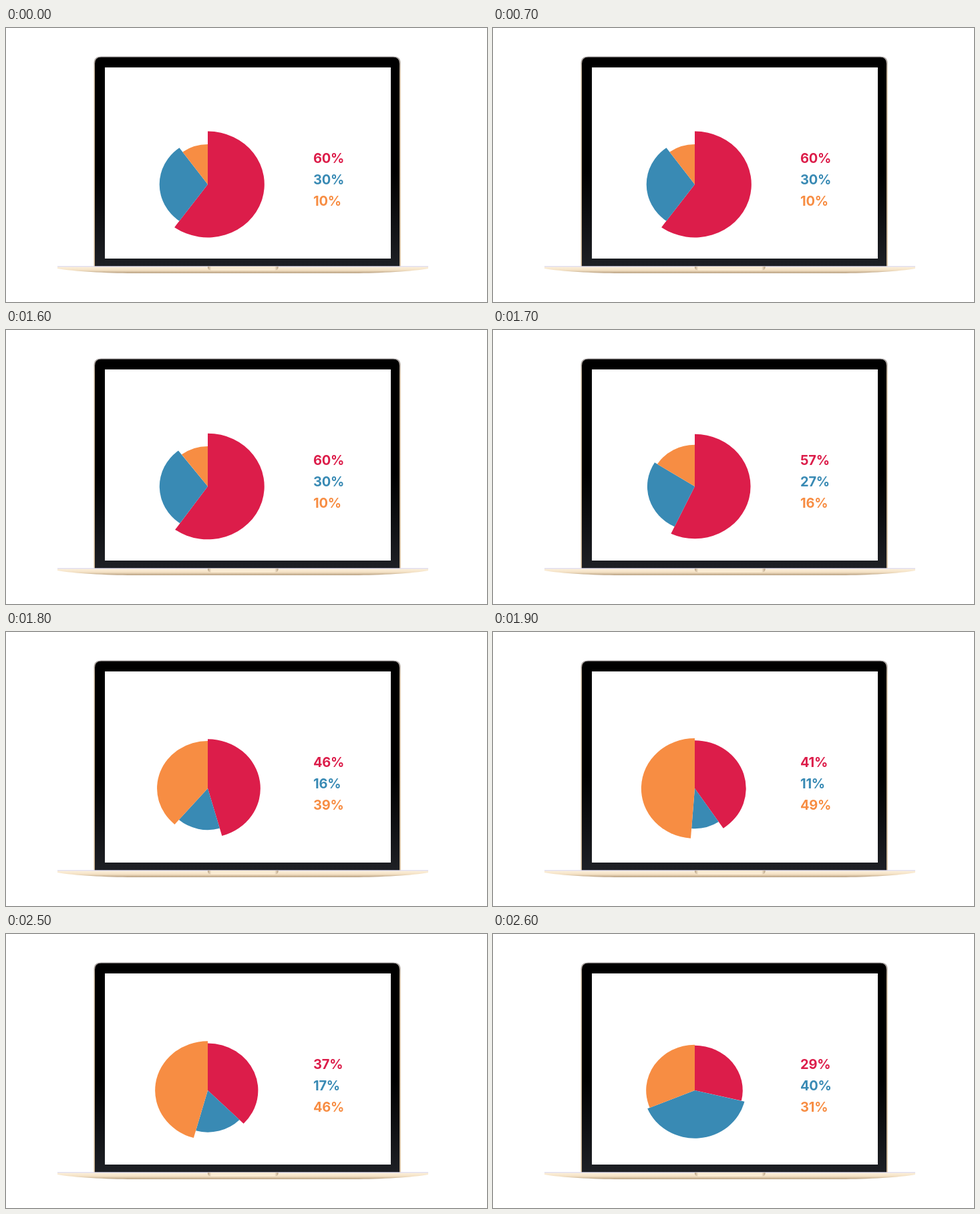
Animation, 720 px wide and 410 px high, one loop 2700 ms. Source, as an HTML page:

```html
<!DOCTYPE html>
<html lang="en">
<head>
<meta charset="utf-8">
<title>Pie chart on a laptop</title>
<style>
  html, body { margin: 0; width: 100%; height: 100%; overflow: hidden; background: #fff; }
  svg { display: block; width: 720px; height: 410px; }
  text { font: 700 20px Inter, Lato, sans-serif; letter-spacing: -0.2px; }
</style>
</head>
<body>
<svg viewBox="0 0 720 410">
  <defs>
    <linearGradient id="bezel" x1="0" y1="0" x2="0" y2="1">
      <stop offset="0.55" stop-color="#000"/>
      <stop offset="1" stop-color="#1e2025"/>
    </linearGradient>
    <linearGradient id="edge" x1="0" y1="0" x2="0" y2="1">
      <stop offset="0" stop-color="#a9a5a6"/>
      <stop offset="0.08" stop-color="#cdb99f"/>
      <stop offset="1" stop-color="#cdb594"/>
    </linearGradient>
    <linearGradient id="base" x1="0" y1="0" x2="0" y2="1">
      <stop offset="0.1" stop-color="#fcefd9"/>
      <stop offset="0.55" stop-color="#f3e0c3"/>
      <stop offset="1" stop-color="#b8a081"/>
    </linearGradient>
    <linearGradient id="notch">
      <stop offset="0" stop-color="#b9a284"/>
      <stop offset="0.05" stop-color="#fbecd3"/>
      <stop offset="0.95" stop-color="#fbecd3"/>
      <stop offset="1" stop-color="#b9a284"/>
    </linearGradient>
  </defs>

  <path fill="url(#edge)" d="M131.5 357V53Q131.5 42.5 142 42.5H580Q590.8 42.5 590.8 53V357Z"/>
  <path fill="url(#bezel)" d="M133 357V53.5Q133 43.8 142.5 43.8H579.5Q589 43.8 589 53.5V357Z"/>
  <path fill="#fff" d="M148 59H576V345H148Z"/>
  <path fill="url(#base)" d="M77 357H632V360C610 364 560 367 520 367H190C150 367 100 364 77 360Z"/>
  <path fill="#dcd9ee" d="M77 356.3H632V357.5H77Z"/>
  <path fill="url(#notch)" d="M302 357H407.5V359Q406.5 362.5 402 362.5H307.5Q303 362.5 302 359Z"/>

  <g id="chart"></g>
</svg>
<script>
  const LOOP = 2700, STEP = 100, EASE_MS = 621;
  const CX = 302, CY = 234, STRETCH = 1.068;
  const COLORS = ['#dc1d4a', '#398ab4', '#f78d43'];
  const STATES = [[60, 30, 10], [40, 10, 50], [25, 50, 25]];
  const STARTS = [1456, 2249];

  const chart = document.getElementById('chart');
  const add = (tag, attrs) => {
    const el = document.createElementNS('http://www.w3.org/2000/svg', tag);
    for (const key in attrs) el.setAttribute(key, attrs[key]);
    return chart.appendChild(el);
  };
  const slices = COLORS.map(fill => add('path', { fill }));
  const labels = COLORS.map((fill, i) => add('text', { fill, x: 460, y: 202.4 + 31.7 * i }));

  const ease = u => u < 0.5 ? 16 * u ** 5 : 1 - 16 * (1 - u) ** 5;
  const progress = (t, start) => ease(Math.min(1, Math.max(0, (t - start) / EASE_MS)));

  function valuesAt(t) {
    const i = t < STARTS[1] ? 0 : 1;
    const k = progress(t, STARTS[i]);
    return STATES[i].map((v, n) => v + (STATES[i + 1][n] - v) * k);
  }

  // Larger shares also reach further out from the centre.
  function slicePath(from, share) {
    const ry = 56 + 0.39 * share, rx = ry * STRETCH;
    const point = percent => {
      const a = percent * Math.PI / 50;
      return `${CX + rx * Math.sin(a)} ${CY - ry * Math.cos(a)}`;
    };
    const large = share > 50 ? 1 : 0;
    return `M${CX} ${CY}L${point(from)}A${rx} ${ry} 0 ${large} 1 ${point(from + share)}Z`;
  }

  function draw(t) {
    let from = 0;
    valuesAt(t).forEach((share, i) => {
      slices[i].setAttribute('d', slicePath(from, share));
      labels[i].textContent = Math.round(share) + '%';
      from += share;
    });
  }

  const origin = performance.now();
  function tick() {
    const t = (performance.now() - origin) % LOOP;
    draw(Math.floor(t / STEP) * STEP);
    requestAnimationFrame(tick);
  }
  tick();
</script>
</body>
</html>
```
